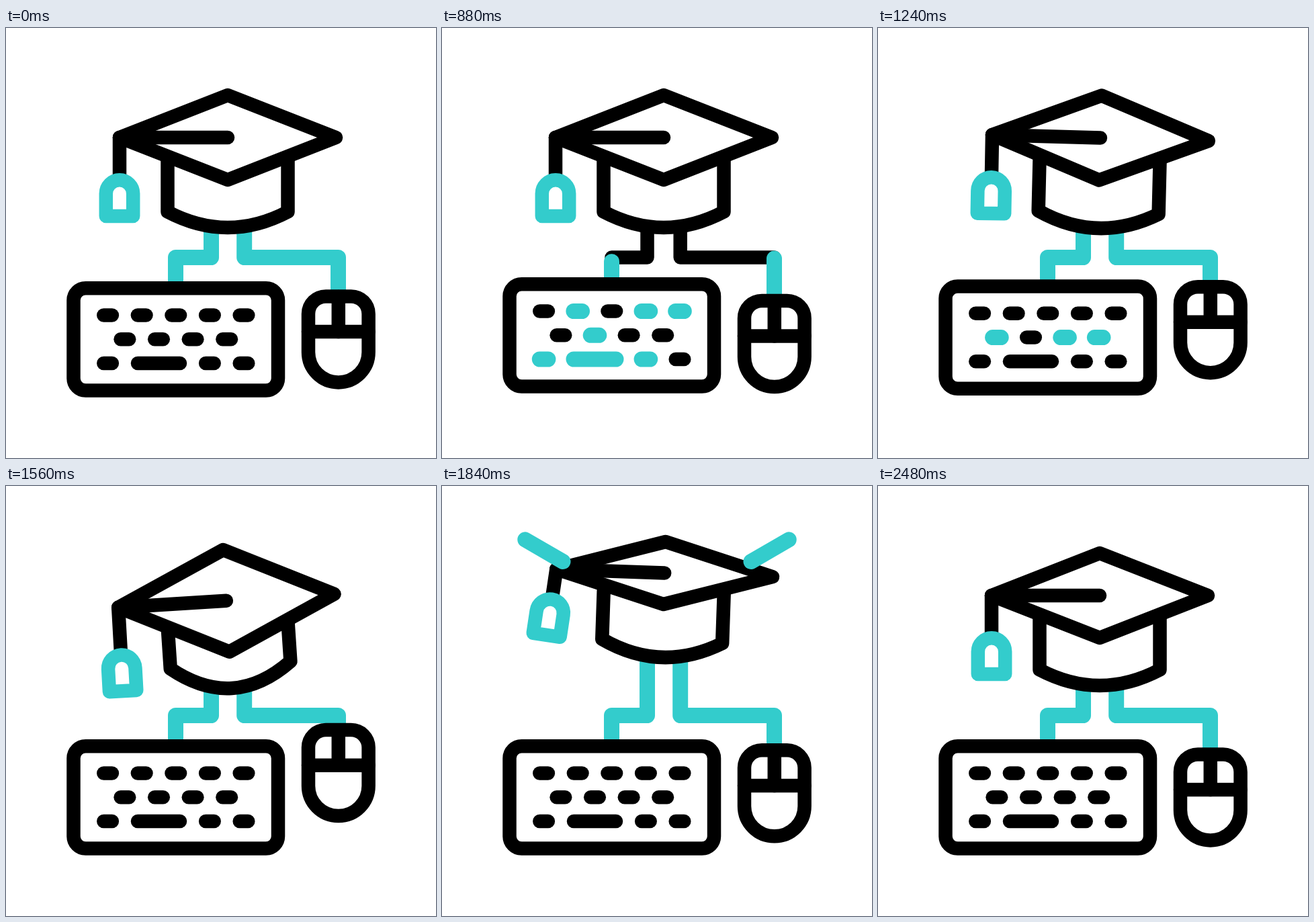
Recreate the animation shown at these times as an HTML page with a canvas. Size 640 by 640 pixels, loop 2560 ms.

```html
<!DOCTYPE html>
<html lang="en">
<head>
<meta charset="utf-8">
<title>E-learning</title>
<style>
html, body { margin: 0; width: 100%; height: 100%; overflow: hidden; background: #fff; }
canvas { display: block; width: 100%; height: 100%; }
</style>
</head>
<body>
<canvas id="stage" width="640" height="640"></canvas>
<script>
const ctx = document.getElementById('stage').getContext('2d');
const LOOP = 2560, STEP = 40;
const INK = '#000', TEAL = '#33cccc';
const THIN = 20.5, WIDE = 23;

const clamp = x => Math.min(1, Math.max(0, x));
const ease = (t, a, b) => (1 - Math.cos(Math.PI * clamp((t - a) / (b - a)))) / 2;

// time, tilt, board y, board half height, rim y, rim depth, tassel swing, tassel drop
const REST = [0, 163, 63, 273.5, 23.5, 0, 90];
const POSES = [
  [0, ...REST],
  [1080, ...REST],
  [1240, 1.6, 163.5, 63, 274.5, 23.5, 1, 90],
  [1560, -3.56, 170.8, 76, 266.5, 34.5, -3.2, 97.5],
  [1840, 2, 129.5, 46.5, 231, 24, 8.5, 72],
  [2120, -0.4, 149, 51.5, 254, 24.5, -1, 78],
  [2400, ...REST],
  [LOOP, ...REST]
];

// Slope at a pose: flat at turning points, otherwise the neighbours' slope
function slope(i, ch) {
  const a = POSES[i - 1], b = POSES[i], c = POSES[i + 1];
  if (!a || !c || (b[ch] - a[ch]) * (c[ch] - b[ch]) <= 0) return 0;
  return (c[ch] - a[ch]) / (c[0] - a[0]);
}

function poseAt(t) {
  let i = 0;
  while (i < POSES.length - 2 && t >= POSES[i + 1][0]) i++;
  const a = POSES[i], b = POSES[i + 1], d = b[0] - a[0], u = (t - a[0]) / d;
  const w = u * u * (3 - 2 * u);
  return REST.map((_, k) => {
    const ch = k + 1;
    return a[ch] + (b[ch] - a[ch]) * w
      + d * u * (1 - u) * ((1 - u) * slope(i, ch) - u * slope(i + 1, ch));
  });
}

function stroke(color, width) {
  ctx.strokeStyle = color;
  ctx.lineWidth = width;
  ctx.stroke();
}

function fillWhite() {
  ctx.fillStyle = '#fff';
  ctx.fill();
}

function trace(points, closed) {
  ctx.beginPath();
  points.forEach(([x, y]) => ctx.lineTo(x, y));
  if (closed) ctx.closePath();
}

function line(points, color = INK, width = THIN) {
  trace(points);
  stroke(color, width);
}

const mix = (p, q, k) => [p[0] + (q[0] - p[0]) * k, p[1] + (q[1] - p[1]) * k];

// Part of a polyline between two fractions of its length
function trim(points, from, to) {
  if (to - from < 0.002) return;
  const lens = points.slice(1).map((p, i) => Math.hypot(p[0] - points[i][0], p[1] - points[i][1]));
  const total = lens.reduce((s, l) => s + l, 0);
  const out = [];
  let pos = 0;
  lens.forEach((len, i) => {
    const a = Math.max(from * total, pos), b = Math.min(to * total, pos + len);
    if (b > a) {
      out.push(mix(points[i], points[i + 1], (a - pos) / len));
      out.push(mix(points[i], points[i + 1], (b - pos) / len));
    }
    pos += len;
  });
  line(out, TEAL, WIDE);
}

const CABLES = [
  [[252.5, 392], [252.5, 341.5], [305.5, 341.5], [305.5, 240]],
  [[494.5, 410], [494.5, 341.5], [354.7, 341.5], [354.7, 240]]
];

function drawCables(t) {
  const gone = ease(t, 240, 720), grown = ease(t, 720, 1240);
  for (const c of CABLES) {
    line(c);
    if (t < 720) trim(c, gone, 1);
    else trim(c, 0, grown);
  }
}

// Keys as x, y, half length, blink group
const KEYS = [];
const addRow = (y, x0, groups) =>
  groups.forEach((g, i) => KEYS.push([x0 + 50.6 * i, y, 6.3, g]));
addRow(427.5, 151.6, [0, 1, 0, 1, 1]);
addRow(463.3, 176.9, [2, 1, 2, 2]);
addRow(499, 151.6, [1]);
addRow(499, 303.4, [1, 0]);
KEYS.push([227.5, 499, 31.5, 1]);

function drawKeyboard(t) {
  const lift = -6 * (ease(t, 240, 880) - ease(t, 880, 1560));
  const lit = t >= 340 && t < 1420 ? Math.floor((t - 340) / 360) : -1;
  ctx.save();
  ctx.translate(0, lift);
  ctx.beginPath();
  ctx.roundRect(100.5, 387.3, 304.5, 152.2, 18);
  fillWhite();
  stroke(INK, THIN);
  for (const [x, y, half, group] of KEYS) {
    const on = group === lit;
    line([[x - half, y], [x + half, y]], on ? TEAL : INK, on ? WIDE : THIN);
  }
  ctx.restore();
}

function drawMouse(t) {
  const dy = 6.6 * ease(t, 240, 880) - 43.6 * ease(t, 880, 1620) + 37 * ease(t, 1620, 1920);
  ctx.save();
  ctx.translate(0, dy);
  ctx.beginPath();
  ctx.roundRect(450, 399.4, 89.6, 128, [26, 26, 44.8, 44.8]);
  fillWhite();
  stroke(INK, THIN);
  line([[450, 452], [539.6, 452]]);
  line([[494.8, 400], [494.8, 452]]);
  ctx.restore();
}

function drawTassel([x, y], swing, drop) {
  ctx.save();
  ctx.translate(x, y);
  ctx.rotate(swing * Math.PI / 180);
  line([[0, 0], [0, drop - 30]]);
  ctx.translate(0, drop);
  ctx.beginPath();
  ctx.moveTo(-20.2, 27);
  ctx.lineTo(-20.2, -6.5);
  ctx.arc(0, -6.5, 20.2, Math.PI, 0);
  ctx.lineTo(20.2, 27);
  ctx.closePath();
  fillWhite();
  stroke(TEAL, THIN);
  ctx.restore();
}

function drawCap(t) {
  const [tilt, boardY, half, rimY, depth, swing, drop] = poseAt(t);
  const sin = Math.sin(tilt * Math.PI / 180), cos = Math.cos(tilt * Math.PI / 180);
  const turn = (cx, cy, x, y) => [cx + x * cos - y * sin, cy + x * sin + y * cos];
  const board = (x, y) => turn(330 + tilt * 0.6, boardY, x, y);
  const rim = (x, y) => turn(330 - tilt * 1.15, rimY, x, y);

  const left = board(-161, 0), right = board(161, 0);
  const top = board(0, -half), bottom = board(0, half);
  const rimL = rim(-89.5, 0), rimR = rim(89.5, 0), dip = rim(0, depth * 2);

  ctx.beginPath();
  ctx.moveTo(...mix(left, bottom, 0.444));
  ctx.lineTo(...rimL);
  ctx.quadraticCurveTo(...dip, ...rimR);
  ctx.lineTo(...mix(right, bottom, 0.444));
  fillWhite();
  stroke(INK, THIN);

  trace([left, top, right, bottom], true);
  fillWhite();
  stroke(INK, THIN);
  line([left, board(0, 0)]);
  drawTassel(left, swing, drop);
}

function drawSparks(t) {
  const head = ease(t, 1600, 1960), tail = ease(t, 1880, 2240);
  trim([[180, 112.5], [105, 69]], tail, head);
  trim([[460, 112.5], [535, 69]], tail, head);
}

function frame(now) {
  const t = Math.floor(now % LOOP / STEP) * STEP;
  ctx.fillStyle = '#fff';
  ctx.fillRect(0, 0, 640, 640);
  ctx.lineCap = ctx.lineJoin = 'round';
  drawCables(t);
  drawKeyboard(t);
  drawMouse(t);
  drawCap(t);
  drawSparks(t);
  requestAnimationFrame(frame);
}
requestAnimationFrame(frame);
</script>
</body>
</html>
```
